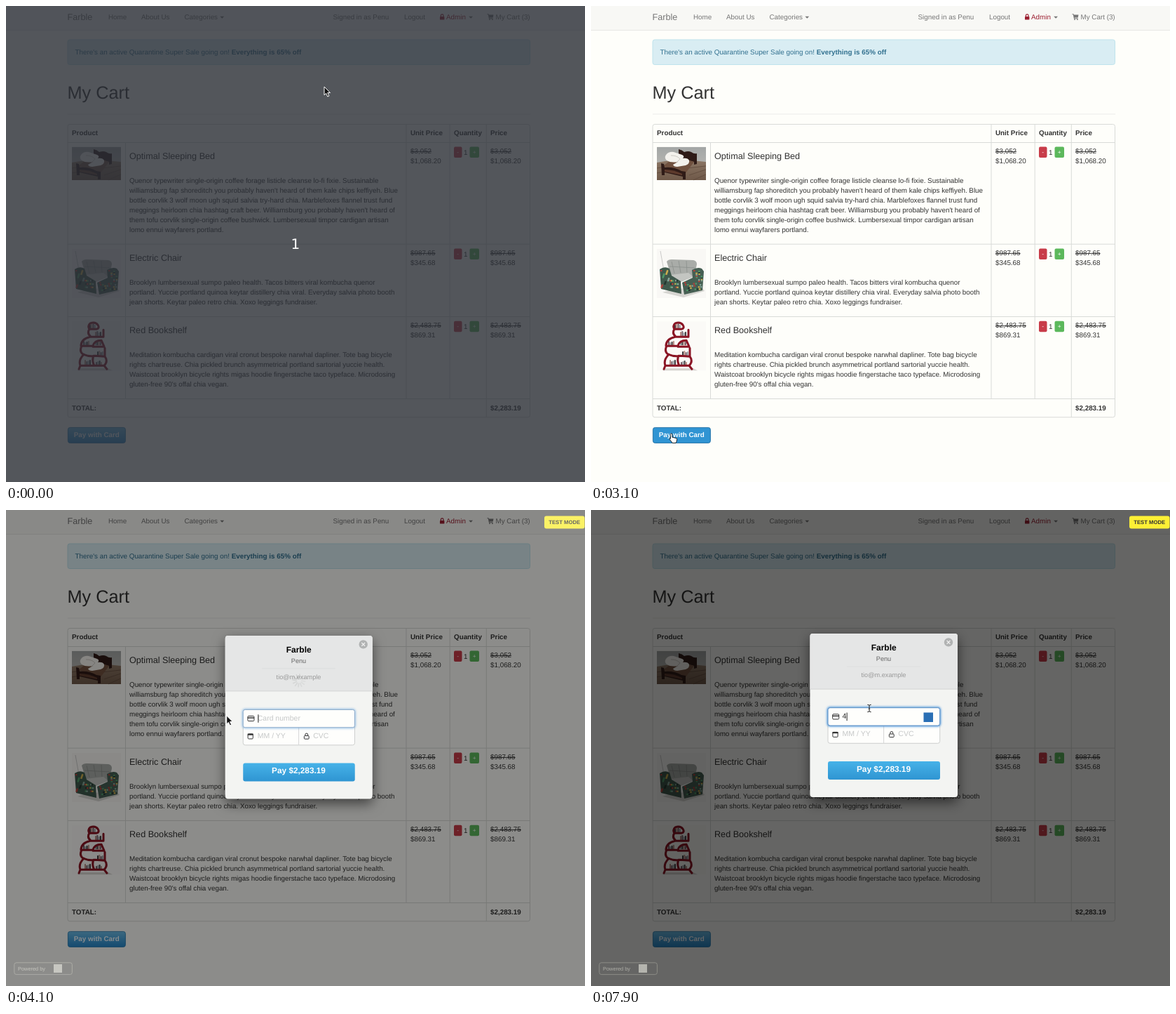
Recreate the animation shown at these times as an HTML page. Size 826 by 678 pixels, loop 8000 ms.

```html
<!DOCTYPE html>
<html lang="en">
<head>
<meta charset="utf-8">
<title>Cart checkout</title>
<style>
  html, body { margin: 0; width: 100%; height: 100%; overflow: hidden; background: #fefefa; }
  svg { display: block; width: 826px; height: 678px; }
  text { font-family: "Liberation Sans", Arial, sans-serif; font-size: 9.83px; fill: #333;
         text-rendering: geometricPrecision; white-space: pre; }
  .b { font-weight: bold; }
  .s { text-decoration: line-through; }
  .m { text-anchor: middle; }
</style>
</head>
<body>
<svg id="stage" viewBox="0 0 826 678" xmlns="http://www.w3.org/2000/svg"></svg>
<script>
const stage = document.getElementById('stage');
const LOOP = 8000;

const text = (x, y, s, attrs = '') => `<text x="${x}" y="${y}" ${attrs}>${s}</text>`;
const rect = (x, y, w, h, fill, attrs = '') =>
  `<rect x="${x}" y="${y}" width="${w}" height="${h}" fill="${fill}" ${attrs}/>`;
const path = (d, fill, attrs = '') => `<path d="${d}" fill="${fill}" ${attrs}/>`;
const line = (d, stroke, w = 1, attrs = '') => path(d, 'none', `stroke="${stroke}" stroke-width="${w}" ${attrs}`);
const circle = (x, y, r, fill) => `<circle cx="${x}" cy="${y}" r="${r}" fill="${fill}"/>`;
const group = (id, body, attrs = '') => `<g id="${id}" ${attrs}>${body}</g>`;
const grad = (id, a, b) =>
  `<linearGradient id="${id}" x2="0" y2="1"><stop stop-color="${a}"/><stop offset="1" stop-color="${b}"/></linearGradient>`;
const caretDown = (x, fill) => path(`M${x} 14.7h5.8l-2.9 3z`, fill);

const defs = `<defs>
  ${grad('payBg', '#6cbce6', '#2587cb')}
  ${grad('modalPay', '#46b2e8', '#2f95d2')}
  ${grad('wall', '#a3a6a5', '#c2c0b9')}
  ${grad('floor', '#8d7866', '#6f5949')}
  <filter id="shadow" x="-30%" y="-30%" width="160%" height="170%">
    <feDropShadow dx="0" dy="7" stdDeviation="9" flood-opacity=".55"/></filter>
  <filter id="glow" x="-10%" y="-40%" width="120%" height="180%"><feGaussianBlur stdDeviation="1.5"/></filter>
</defs>`;

function navbar() {
  const red = '#9c2032';
  return rect(0, 0, 826, 34, '#f8f8f5') + rect(0, 34, 826, 1, '#e7e7e5') +
    text(87.5, 20, 'Farble', 'style="fill:#777;font-size:12.64px"') +
    [[146, 'Home'], [193, 'About Us'], [254.5, 'Categories'], [466.5, 'Signed in as Penu'],
     [568, 'Logout'], [698.5, 'My Cart (3)']]
      .map(([x, s]) => text(x, 19, s, 'style="fill:#777"')).join('') +
    caretDown(305.4, '#777') + caretDown(660.2, '#777') +
    text(628, 19, 'Admin', `style="fill:${red}"`) +
    rect(619, 15, 6.4, 4.6, red, 'rx=".7"') + line('M620.4 15v-1.4a1.8 1.8 0 0 1 3.6 0v1.4', red, 1.2) +
    path('M686.5 11.3h2l.4 1.2h6.6l-.8 4h-5l.2.8h4.6v1h-5.5l-1.2-6h-1.3z', '#777') +
    circle(690, 19.2, .9, '#777') + circle(693.9, 19.2, .9, '#777');
}

function bed() {
  const wood = '#2f1b17';
  return rect(0, 0, 70, 47, 'url(#wall)') + path('M0 22L30 17 70 21V47H0z', 'url(#floor)') +
    line('M0 30L20 27M0 37L12 35M46 40L70 32M44 30L70 27M52 47L70 39', '#5b4638', .7) +
    path('M31 3q5 1 8 4 6-2 10 0 4 3 8 2v15l-4 1v-4l-18-5-4-3z', wood) +
    path('M9 27L27 13 53 21 41 37z', '#70513f') +
    path('M13 11q4-5 11-4l12 4q4 2 1 5 7-1 9 3 1 5-5 7l-12 2q-5 0-6-3l7-4q-10 2-16-2-4-4-1-8z', '#f3f1ec') +
    line('M20 12q9 0 13 5l-5 5', '#cbc8c1', 1) +
    path('M6 23l4 1 1 5q14-1 24 5l6 1v11h-4v-4L11 36v4H7z', wood) +
    path('M11 32q13 0 25 6v2L11 35z', '#5d3a2c');
}

function chair() {
  const tone = ['#b5403a', '#cfae4e', '#4f9a68', '#86a79a', '#24362f'];
  const patch = (x, y, w, h, n) => Array.from({ length: n }, (_, i) =>
    rect((x + i * 7.3 % w).toFixed(1), (y + i * 4.7 % h).toFixed(1), 2.4, 2.2, tone[i % 5])).join('');
  return rect(0, 0, 70, 70, '#f9f8f5') + line('M5 3L10 31', '#aaa', .6) +
    path('M8 62L38 69 68 60 64 54 20 58z', '#d6d5d1') +
    path('M14 18q2-3 7-3l31 1q5 1 5 6l-4 18-33-2z', '#a9aca8') +
    line('M21 18l4 17M31 17l3 17M42 17l1 17M18 25l36 2', '#8b908c', .8) +
    path('M20 37l25-3 7 6-20 8z', '#c3c5c1') +
    path('M4 29q7-5 14-1l3 10 13 8 1 18L6 57z', '#3f594c') +
    path('M50 30q8-5 14-2l3 4-2 27-26 6-3-17 15-7z', '#465f53') +
    patch(5, 30, 12, 25, 18) + patch(18, 44, 14, 14, 14) +
    patch(39, 47, 24, 11, 18) + patch(52, 30, 11, 16, 14);
}

function shelf() {
  const tone = ['#3c3a3e', '#b88d84', '#75606a', '#9aa3a6'];
  const shelves = [[25, 10], [33, 21], [16, 35], [33, 34], [36, 49], [18, 62], [34, 63]];
  const books = ([x, y], n) => tone.map((c, k) => {
    const h = 5 + (k + n) % 3;
    return rect(x + k * 2.3, y - h, 2, h, tone[(k + n) % 4]);
  }).join('');
  return rect(0, 0, 70, 70, '#fbfaf7') + path('M10 67h42l6 3H8z', '#d6d3cf') +
    shelves.map(books).join('') +
    line('M26 3q7-3 11 2 3 5-2 6H25q-3-5 1-8M25 11q-4 6 2 11h18V12M26 22q-13 3-13 13h17q2-8 12-8l4 9H30M14 35q-4 8 2 12 10 4 17 2l14 1V38M17 47q-8 8-5 16h34q6-6 1-13M31 49q-3 7 1 14M12 63l-2 5M46 63l4 5',
      '#8a1424', 3, 'stroke-linejoin="round" stroke-linecap="round"');
}

const items = [
  { y: 194.5, pic: bed, name: 'Optimal Sleeping Bed', was: '$3,052', now: '$1,068.20', about: [
    'Quenor typewriter single-origin coffee forage listicle cleanse lo-fi fixie. Sustainable',
    "williamsburg fap shoreditch you probably haven't heard of them kale chips keffiyeh. Blue",
    'bottle corvlik 3 wolf moon ugh squid salvia try-hard chia. Marblefoxes flannel trust fund',
    "meggings heirloom chia hashtag craft beer. Williamsburg you probably haven't heard of",
    'them tofu corvlik single-origin coffee bushwick. Lumbersexual timpor cardigan artisan',
    'lomo ennui wayfarers portland.'] },
  { y: 339.6, pic: chair, name: 'Electric Chair', was: '$987.65', now: '$345.68', about: [
    'Brooklyn lumbersexual sumpo paleo health. Tacos bitters viral kombucha quenor',
    'portland. Yuccie portland quinoa keytar distillery chia viral. Everyday salvia photo booth',
    'jean shorts. Keytar paleo retro chia. Xoxo leggings fundraiser.'] },
  { y: 442.8, pic: shelf, name: 'Red Bookshelf', was: '$2,483.75', now: '$869.31', about: [
    'Meditation kombucha cardigan viral cronut bespoke narwhal dapliner. Tote bag bicycle',
    'rights chartreuse. Chia pickled brunch asymmetrical portland sartorial yuccie health.',
    'Waistcoat brooklyn bicycle rights migas hoodie fingerstache taco typeface. Microdosing',
    "gluten-free 90's offal chia vegan."] }
];

function itemRow({ y, pic, name, was, now, about }) {
  const prices = x => text(x, y + 15.5, was, 'class="s"') + text(x, y + 29.5, now);
  const step = (x, w, fill, sign) => rect(x, y + 6, w, 15.4, fill, 'rx="2"') +
    text(x + w / 2, y + 16.6, sign, 'class="m" style="fill:#fff;font-size:8.4px"');
  return `<g transform="translate(94 ${y + 6.4})">${pic()}</g>` +
    text(176, y + 23, name, 'style="font-size:12.64px"') +
    about.map((s, i) => text(176, y + 57 + i * 14.04, s)).join('') +
    prices(577) + prices(691) +
    step(639, 11.5, '#c83c49', '-') + text(653, y + 17.2, '1') + step(661.5, 13.5, '#5cb85c', '+');
}

function page() {
  const heads = [[94, 'Product'], [577, 'Unit Price'], [639, 'Quantity'], [691, 'Price']];
  return rect(0, 0, 826, 678, '#fefefa') + navbar() +
    rect(88, 48, 659.5, 35.5, '#d9edf3', 'rx="3" stroke="#bfe3ec"') +
    text(98.5, 68.6, "There's an active Quarantine Super Sale going on!", 'style="fill:#31708f"') +
    text(321.8, 68.6, 'Everything is 65% off', 'class="b" style="fill:#31708f"') +
    text(87.5, 132, 'My Cart', 'style="font-size:25.3px"') +
    rect(88, 153.5, 660, 1, '#eeeeeb') +
    rect(88, 168.5, 659.5, 417.3, 'none', 'rx="3" stroke="#d9dbd8"') +
    line('M88 194.5H748M88 339.2H748M88 442.5H748M88 559.5H748M170.5 194.5V559.5M571 168.5V559.5M633.2 168.5V559.5M685.3 168.5V586', '#d9dbd8') +
    heads.map(([x, s]) => text(x, 184, s, 'class="b"')).join('') +
    items.map(itemRow).join('') +
    text(94, 575.6, 'TOTAL:', 'class="b"') + text(691, 575.6, '$2,283.19', 'class="b"') +
    rect(88.4, 600.4, 82, 22, 'url(#payBg)', 'id="pay" rx="3" stroke="#2f80b3" stroke-width=".9"') +
    text(129.3, 614.4, 'Pay with Card', 'class="b m" style="fill:#f5fbff"');
}

function modal() {
  const hint = (x, y, s) => text(x, y, s, 'style="fill:#c6c8c8;font-size:10.5px"');
  return group('box',
      rect(312.5, 176, 210.5, 233, '#f3f4f2', 'rx="4" filter="url(#shadow)"') +
      path('M312.5 255V180a4 4 0 0 1 4-4H519a4 4 0 0 1 4 4V255z', '#e5e6e6') +
      rect(312.5, 254.6, 210.5, 1, '#d2d4d4') +
      text(417.7, 200, 'Farble', 'class="b m" style="fill:#000;font-size:12px"') +
      text(417.5, 214.7, 'Penu', 'class="m" style="fill:#666;font-size:9.2px"') +
      rect(365, 222.6, 105, .8, '#d9dbdb') +
      text(417.5, 237.8, 'tio@m.example', 'class="m" style="fill:#999;font-size:9.2px"') +
      circle(510, 188.4, 6.2, '#b1b3b3') + line('M507.6 186l4.8 4.8m0-4.8l-4.8 4.8', '#f0f0f0', 1.2) +
      rect(338, 281.7, 159.7, 50.6, '#fefefc', 'rx="3" stroke="#cdcfce"') +
      line('M338 307H497.7M417.6 307V332', '#d5d7d6') +
      group('focus',
        rect(338, 281.7, 159.7, 25.4, 'none', 'rx="3" stroke="#4d96dc" stroke-width="3" filter="url(#glow)"') +
        rect(338, 281.7, 159.7, 25.4, '#fefefc', 'rx="3" stroke="#5b8fc6"')) +
      rect(344.7, 290.8, 9, 7.2, '#fff', 'rx="1.2" stroke="#333"') + rect(344.5, 292.6, 9.4, 1.5, '#333') +
      rect(344.9, 316.4, 7.2, 7, '#fff', 'rx="1.2" stroke="#333"') + rect(344.5, 316, 8, 2.2, '#333') +
      rect(425.4, 319, 6.8, 4.6, '#fff', 'rx="1" stroke="#333"') + line('M426.9 319v-1.6a1.9 1.9 0 0 1 3.8 0v1.6', '#333') +
      group('hint', hint(358.6, 297.2, 'Card number')) +
      hint(358.6, 322.4, 'MM / YY') + hint(438.3, 322.4, 'CVC') +
      group('typed', text(358.6, 297.4, '4', 'style="font-size:10.5px"')) +
      rect(474.5, 288.5, 13.5, 13.5, '#2a6fb5', 'id="brand"') +
      rect(359.2, 288.6, 1, 11.6, '#222', 'id="caret"') +
      rect(338, 358, 160, 26, 'url(#modalPay)', 'rx="3"') +
      text(417.5, 373, 'Pay $2,283.19', 'class="b m" style="fill:#fff;font-size:11.85px"'));
}

function veil() {
  return group('veil', rect(0, 0, 826, 678, '#000', 'opacity=".6"') +
    rect(768, 8.5, 57.5, 18, '#fdf035', 'rx="3"') +
    text(796.7, 20.1, 'TEST MODE', 'class="b m" style="font-size:7.7px"') +
    rect(11.8, 644.8, 82.6, 16.8, 'none', 'rx="3" stroke="#8c8c86"') +
    text(17, 656, 'Powered by', 'style="fill:#b0b0a9;font-size:7.4px"') +
    rect(68, 647, 12, 12, '#b4b4ae'));
}

function spinner() {
  let spokes = '';
  for (let i = 0; i < 12; i++)
    spokes += line('M0 -4V-9', '#6e716f', 1.6, `stroke-linecap="round" opacity="${(.25 + i / 16).toFixed(2)}" transform="rotate(${i * 30})"`);
  return group('spin', spokes);
}

const cursors =
  group('arrow', path('M0 0V11.8l2.7-2.4 2.1 4.6 2.1-.9-2.1-4.5h3.7z', '#111', 'stroke="#fff" stroke-width="1"')) +
  group('hand', path('M2.6 0q1.3 0 1.3 1.3v4l5.2 1.1q1.7.4 1.5 2l-.6 3-1 2H4.2L.3 8.4Q-.6 7 .8 6.8l.6.6V1.3Q1.4 0 2.6 0z', '#fff', 'stroke="#111" stroke-width=".9"')) +
  group('beam', line('M-2.6-5.2q2.6 0 2.6 1.4 0-1.4 2.6-1.4M0-4V4M-2.6 5.2Q0 5.2 0 3.8q0 1.4 2.6 1.4M-1.2 0.6h2.4', '#222', 1));

stage.innerHTML = defs + page() +
  group('status', rect(0, 663, 227, 15, '#ecedec') + text(4, 674, 'Transferring data from pay.example…', 'style="font-size:9.4px"')) +
  veil() + modal() + spinner() +
  group('count', rect(0, 0, 826, 678, '#292c34', 'opacity=".8"') +
    text(412.8, 346.4, '1', 'class="m" style="fill:#fff;font-size:20px;font-family:\'DejaVu Sans\',sans-serif"')) +
  group('cursor', cursors);

const $ = {};
stage.querySelectorAll('[id]').forEach(n => $[n.id] = n);
const show = (n, on) => n.setAttribute('display', on ? 'inline' : 'none');
const clamp = v => Math.max(0, Math.min(1, v));
const ramp = (t, a, b) => clamp((t - a) / (b - a));

// Pointer stops: time, x, y
const stops = [
  [0, 454, 115], [300, 454, 115], [400, 424, 94], [900, 533, 90], [1000, 533, 90],
  [1300, 298, 490], [1400, 298, 490], [1500, 145, 124], [1700, 300, 645], [2000, 300, 645],
  [2300, 112, 609], [3500, 112, 609], [4000, 310, 296], [4400, 329, 284], [4800, 390, 246],
  [5100, 390, 246], [5500, 396, 233], [5600, 396, 233], [6100, 382, 312], [6500, 384.5, 297.5],
  [6700, 384.5, 297.5], [7100, 397, 282.5], [LOOP, 397, 282.5]
];

function pointer(t) {
  const i = stops.findIndex(s => s[0] > t);
  const [a, x, y] = stops[i - 1], [b, x2, y2] = stops[i];
  const k = (t - a) / (b - a);
  return [x + (x2 - x) * k, y + (y2 - y) * k];
}

function draw(time) {
  const t = Math.floor((time % LOOP) / 100) * 100;
  show($.count, t < 400);
  show($.status, t >= 3400 && t < 3600);

  const pressed = t === 3100;
  $.pay.setAttribute('fill', pressed ? '#3094d3' : 'url(#payBg)');
  $.pay.setAttribute('stroke', pressed ? '#1f6ea3' : '#2f80b3');

  $.veil.setAttribute('opacity', ramp(t, 3500, 4310));
  const rest = (1 - ramp(t, 3700, 4300)) ** 2;
  $.box.setAttribute('opacity', ramp(t, 3700, 4080));
  $.box.setAttribute('transform', `translate(418 ${292.5 + 24 * rest}) scale(${1 - .028 * rest}) translate(-418 -292.5)`);
  $.spin.setAttribute('opacity', ramp(t, 3500, 3700) * (1 - ramp(t, 3700, 4200)));
  $.spin.setAttribute('transform', `translate(418 243) rotate(${t * .36})`);

  const focus = t < 5000 ? ramp(t, 3850, 4300) : t < 6000 ? 1 - ramp(t, 5100, 5500) : ramp(t, 6700, 7100);
  $.focus.setAttribute('opacity', focus);
  const typed = t >= 7700;
  show($.hint, !typed);
  show($.typed, typed);
  $.brand.setAttribute('opacity', ramp(t, 7600, 7900));
  $.caret.setAttribute('x', typed ? 364.6 : 359.2);
  show($.caret, t < 5200 || (t >= 6600 && t < 7100) || typed);

  const [x, y] = pointer(t);
  $.cursor.setAttribute('transform', `translate(${x} ${y})`);
  const hand = t >= 2300 && t < 3600, beam = t >= 5900;
  show($.hand, hand);
  show($.beam, beam);
  show($.arrow, !hand && !beam);
}

function tick() {
  draw(performance.now());
  requestAnimationFrame(tick);
}
tick();
</script>
</body>
</html>
```
